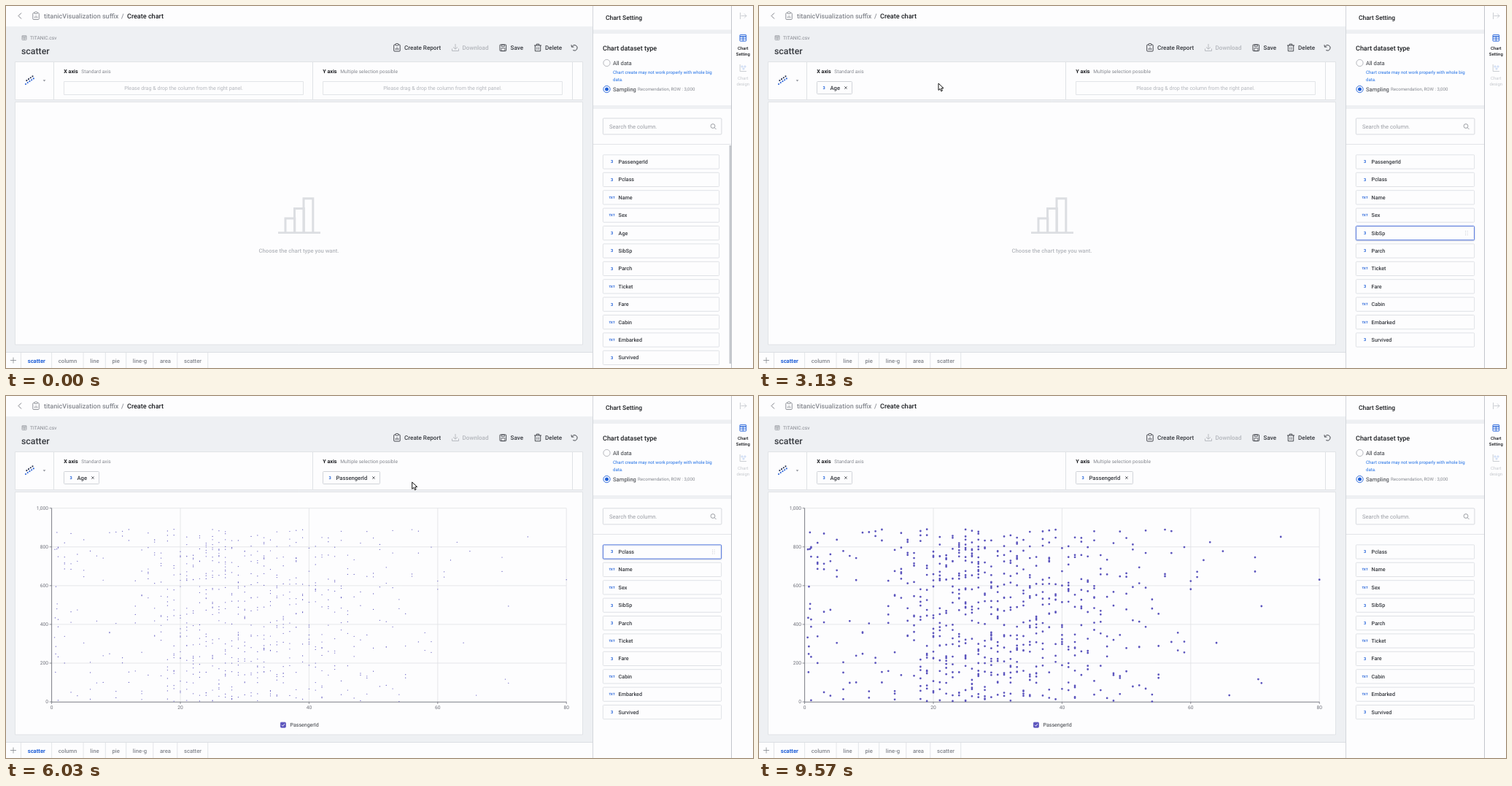
An HTML page with a canvas that plays this animation: 1024x496 px, repeating every 9.61 s.

```html
<!DOCTYPE html>
<html lang="en">
<head>
<meta charset="utf-8">
<title>Create chart</title>
<style>
html, body { margin: 0; width: 100%; height: 100%; overflow: hidden; background: #fdfdfe; }
canvas { display: block; width: 1024px; height: 496px; }
</style>
</head>
<body>
<canvas id="stage"></canvas>
<script>
const W = 1024, H = 496, LOOP = 9610;
const canvas = document.getElementById('stage');
const dpr = window.devicePixelRatio || 1;
canvas.width = W * dpr;
canvas.height = H * dpr;
const c = canvas.getContext('2d');
c.scale(dpr, dpr);
c.textRendering = 'geometricPrecision';

const WHITE = '#fdfdfe', PAGE = '#eef0f3', LINE = '#dcdfe3', INK = '#36393f', BLACK = '#1b1d21',
  MUTE = '#b3b6bc', PALE = '#c6c9ce', GREY = '#85888f', AXIS = '#6e7079', BLUE = '#1f5fd8',
  DOT = '#5b54bd';
const PROMPT = 'Please drag & drop the column from the right panel.';
const COLUMNS = ['PassengerId', 'Pclass', 'Name', 'Sex', 'Age', 'SibSp', 'Parch',
  'Ticket', 'Fare', 'Cabin', 'Embarked', 'Survived'];
const TEXTUAL = ['Name', 'Sex', 'Ticket', 'Cabin', 'Embarked'];
const TABS = ['scatter', 'column', 'line', 'pie', 'line-g', 'area', 'scatter'];

// Timeline in ms; key points are [time, x, y]
const AXES = 3480, DOTS = 5950, LEAVE = 7250, GONE = 7700;
const DRAGS = [
  { name: 'Age', from: 1720, to: 3130, width: 160,
    path: [[1720, 818, 302], [2370, 312, 115], [2970, 231, 103]] },
  { name: 'PassengerId', from: 4720, to: 5700, width: 163,
    path: [[4720, 818, 204], [4800, 812, 203], [5330, 535, 104]] },
];
const POINTER = [[1050, 1040, 330], [1500, 835, 309], [1720, 835, 309], [2370, 330, 122],
  [2970, 248, 110], [3300, 248, 110], [4450, 830, 215], [4720, 830, 215], [4800, 811, 208],
  [5330, 559, 122], [LEAVE, 558, 122], [GONE, 640, -20]];

const dragAt = t => DRAGS.find(d => t >= d.from && t < d.to);

function at(track, t) {
  const i = track.findIndex(k => k[0] > t);
  if (i < 0) return track[track.length - 1].slice(1);
  if (i === 0) return track[0].slice(1);
  const a = track[i - 1], b = track[i];
  const u = (t - a[0]) / (b[0] - a[0]), e = u * u * (3 - 2 * u);
  return [a[1] + (b[1] - a[1]) * e, a[2] + (b[2] - a[2]) * e];
}

// y is the middle of the capitals; returns the width
function text(s, x, y, size, color, weight = 400, align = 'left') {
  c.font = `${weight} ${size}px Roboto, sans-serif`;
  c.textAlign = align;
  c.fillStyle = color;
  c.fillText(s, x, y + size * 0.355);
  return c.measureText(s).width;
}
function rect(x, y, w, h, color) {
  c.fillStyle = color;
  c.fillRect(x, y, w, h);
}
function box(x, y, w, h, stroke, fill, r = 1, lw = 0.8) {
  c.beginPath();
  c.roundRect(x, y, w, h, r);
  if (fill) { c.fillStyle = fill; c.fill(); }
  c.strokeStyle = stroke;
  c.lineWidth = lw;
  c.stroke();
}
function line(color, lw, ...p) {
  c.beginPath();
  for (let i = 0; i < p.length; i += 2) c.lineTo(p[i], p[i + 1]);
  c.strokeStyle = color;
  c.lineWidth = lw;
  c.stroke();
}
function disc(x, y, r, color) {
  c.beginPath();
  c.arc(x, y, r, 0, 7);
  c.fillStyle = color;
  c.fill();
}
function ring(x, y, r, color, lw = 1, from = 0, to = 7) {
  c.beginPath();
  c.arc(x, y, r, from, to);
  c.strokeStyle = color;
  c.lineWidth = lw;
  c.stroke();
}

function clipboard(x, y, color) {
  box(x, y + 1.5, 8.5, 9, color, null, 1, 0.9);
  box(x + 2.5, y, 3.5, 2.6, color, WHITE, 0.5, 0.8);
  for (let i = 0; i < 3; i++) {
    const bx = x + 2.5 + i * 1.8;
    line(color, 0.8, bx, y + 8.5, bx, y + 6.5 - (i % 2) * 1.5);
  }
}
function table(x, y, s, color, lw) {
  box(x, y, s, s, color, null, 0.5, lw);
  line(color, lw * 1.5, x, y + s * 0.28, x + s, y + s * 0.28);
  line(color, lw, x, y + s * 0.64, x + s, y + s * 0.64);
  line(color, lw, x + s * 0.5, y + s * 0.28, x + s * 0.5, y + s);
}
function actions() {
  clipboard(531.7, 51.5, INK);
  text('Create Report', 546, 57, 8.1, INK, 500);

  line(MUTE, 0.9, 616, 52, 616, 59);
  line(MUTE, 0.9, 613, 56.3, 616, 59.2, 619, 56.3);
  line(MUTE, 0.9, 611.5, 58.5, 611.5, 61.5, 620.5, 61.5, 620.5, 58.5);
  text('Download', 625.5, 57, 8.1, MUTE, 500);

  box(677, 53, 8.6, 8.6, INK, null, 0.8, 0.9);
  box(679.2, 53, 4.2, 2.6, INK, null, 0, 0.7);
  box(679, 57.8, 4.8, 3.8, INK, null, 0, 0.7);
  text('Save', 691.5, 57, 8.1, INK, 500);

  line(INK, 0.9, 724, 54, 734, 54);
  line(INK, 0.9, 727.2, 54, 727.2, 52.2, 730.8, 52.2, 730.8, 54);
  line(INK, 0.9, 725.3, 54, 725.3, 61.8, 732.7, 61.8, 732.7, 54);
  for (const x of [727.8, 730.2]) line(INK, 0.7, x, 56.3, x, 60);
  text('Delete', 739, 57, 8.1, INK, 500);

  ring(779.3, 57.3, 3.8, INK, 0.9, -2.7, 2.2);
  line(INK, 0.9, 775, 53.2, 775.4, 56.2, 778.4, 56);
}

function tabs() {
  line(LINE, 1, 0, 474.5, 804, 474.5);
  line(GREY, 0.8, 6, 485.5, 14, 485.5);
  line(GREY, 0.8, 10, 481.5, 10, 489.5);
  let x = 20.5;
  line(LINE, 0.8, x, 475, x, H);
  TABS.forEach((s, i) => {
    x += 18 + text(s, x + 9.2, 485.8, 7.65, i ? GREY : BLUE, i ? 500 : 700);
    line(LINE, 0.8, x, 475, x, H);
  });
}

function page() {
  rect(0, 0, W, H, WHITE);
  rect(0, 28, 804, 446, PAGE);
  line(AXIS, 0.9, 21, 9.5, 17, 13.5, 21, 17.5);
  clipboard(36.8, 8, GREY);
  text('titanicVisualization suffix', 52, 13.5, 9.05, GREY, 500);
  text('/', 158, 13.5, 9.05, GREY, 500);
  text('Create chart', 166, 13.5, 9.05, BLACK, 500);
  table(22, 40.5, 6, GREY, 0.6);
  text('TITANIC.csv', 33, 43.2, 6.65, GREY);
  text('scatter', 21, 62, 12.3, INK, 500);
  actions();
  box(12.5, 76.5, 778, 52, LINE, WHITE, 0);
  box(12.5, 131.5, 778, 332.5, LINE, WHITE, 0);
  tabs();
}

function typeIcon() {
  for (let i = 0; i < 9; i++) {
    const lane = i % 2;
    disc(27 + i * 1.35, 105 - i * 0.95 + (lane ? -2 : 2), 1.1, lane ? '#2b3350' : '#2f66d8');
  }
  c.beginPath();
  c.moveTo(50.6, 101.2);
  c.lineTo(54.4, 101.2);
  c.lineTo(52.5, 103.4);
  c.fillStyle = '#8f929a';
  c.fill();
}

function chip(x, w, name) {
  box(x, 103.5, w, 17, '#c6cad0', WHITE, 1);
  text('3', x + 9.5, 112, 5.6, BLUE, 700, 'center');
  text(name, x + 18, 112, 7.65, INK, 500);
  const k = x + w - 8.6;
  line(INK, 0.8, k - 1.7, 110.3, k + 1.7, 113.7);
  line(INK, 0.8, k + 1.7, 110.3, k - 1.7, 113.7);
}
function zone(x, w, title, note, name, chipW, active) {
  if (active) rect(x, 77, w, 51, '#e1edfc');
  text(title, x + 13.3, 89.6, 7.15, BLACK, 700);
  text(note, x + 37.3, 89.6, 6.65, GREY);
  if (name) return chip(x + 13.5, chipW, name);
  if (active) c.setLineDash([1.2, 1]);
  box(x + 13.5, 103.5, 328, 18, active ? '#3f69ae' : LINE, null, 0);
  c.setLineDash([]);
  text(PROMPT, x + 177.5, 112.3, 7.13, active ? BLUE : MUTE, 400, 'center');
}
function axisPanel(t, used) {
  typeIcon();
  const [px, py] = at(POINTER, t);
  const over = dragAt(t) && py > 76 && py < 129;
  zone(66, 354.5, 'X axis', 'Standard axis', used[0], 48, over && px < 420);
  zone(421, 355.5, 'Y axis', 'Multiple selection possible', used[1], 78,
    over && px >= 420 && px < 776);
  for (const x of [65.5, 420.5, 776.5]) line(LINE, 0.9, x, 77, x, 128);
}

function emptyChart() {
  const g = '#dcdee2';
  rect(373, 309.3, 58, 2.7, g);
  for (let i = 0; i < 3; i++) {
    const x = 383 + i * 12.5, y = 291 - i * 13.6;
    line(g, 3, x, 310, x, y, x + 12.8, y, x + 12.8, 310);
  }
  text('Choose the chart type you want.', 401.5, 335, 7.65, MUTE, 500, 'center');
}

let seed = 1912;
function rnd() {
  seed = (Math.imul(seed, 1664525) + 1013904223) >>> 0;
  return seed / 4294967296;
}
// Passengers per year of age: a tail of small children and a skewed bell around 24
function crowd(age) {
  const bell = Math.exp(-(((age - 24) / (age < 24 ? 6 : 16)) ** 2) / 2);
  return 9 * Math.exp(-age / 7) + 24 * bell;
}
const points = [[66, 34], [70, 673], [70, 746], [70.5, 117], [71, 97], [71, 494], [74, 852], [80, 631]];
for (let age = 0; age <= 65; age++) {
  const n = Math.round(crowd(age) * (0.8 + rnd() * 0.4));
  for (let i = 0; i < n; i++) points.push([age || 0.4 + rnd() * 0.6, 1 + rnd() * 890]);
}

const gx = age => 62.6 + age * 8.82;
const gy = id => 419.1 - id * 0.2654;

function scatter(t) {
  const u = Math.min(1, (t - DOTS) / 450), r = 1.4 * (1 - (1 - u) ** 3);
  c.beginPath();
  for (const [age, id] of points) {
    const x = gx(age), y = gy(id);
    c.moveTo(x + r, y);
    c.arc(x, y, r, 0, 7);
  }
  c.fillStyle = DOT;
  c.fill();
  box(376.4, 447.2, 7, 7, DOT, DOT, 1);
  line('#fff', 1, 378, 450.8, 379.5, 452.3, 382, 449.2);
  text('PassengerId', 389.5, 450.7, 7.05, INK);
}
function chart(t) {
  const full = t >= DOTS, grid = '#e0e1e5';
  for (let a = 0; a <= 80; a += 20) {
    const x = gx(a);
    if (!full) c.setLineDash([2, 1]);
    if (a) line(grid, 0.8, x, 153.6, x, 419);
    c.setLineDash([]);
    line(AXIS, 0.8, x, 419, x, 422);
    text(a, x, 426.2, 6.7, AXIS, 400, 'center');
  }
  if (full) for (let v = 0; v <= 1000; v += 200) {
    const y = gy(v);
    if (v) line(grid, 0.8, 62.6, y, 768, y);
    line(AXIS, 0.8, 59.6, y, 62.6, y);
    text(v.toLocaleString('en-US'), 58, y, 6.7, AXIS, 400, 'right');
  }
  line(AXIS, 0.9, 62.6, 153.6, 62.6, 419.3, 768.2, 419.3);
  if (full) scatter(t);
}

function item(x, y, w, name, hot) {
  if (hot) {
    c.shadowColor = 'rgba(40,60,110,.15)';
    c.shadowBlur = 2 * dpr;
    c.shadowOffsetY = dpr;
  }
  box(x + 0.4, y, w - 0.8, 19.2, hot ? '#4169dd' : '#d8dbe0', WHITE, 1, hot ? 0.9 : 0.8);
  c.shadowColor = 'transparent';
  const wordy = TEXTUAL.includes(name);
  text(wordy ? 'TXT' : '3', x + 12.5, y + 9.6, wordy ? 4.4 : 5.6, BLUE, 700, 'center');
  text(name, x + 21.6, y + 9.6, 7.2, INK, 500);
  if (!hot) return;
  for (let i = 0; i < 6; i++)
    rect(x + w - 13 + (i % 2) * 2.6, y + 6.6 + (i >> 1) * 2.5, 1, 1, '#c9ccd2');
}

function settings() {
  text('Chart Setting', 822, 16.3, 8.5, BLACK, 500);
  text('Chart dataset type', 818, 58, 9, BLACK, 500);
  ring(823.5, 78, 4.6, '#a5a8ae', 0.8);
  text('All data', 832, 78, 7.65, INK);
  text('Chart create may not work properly with whole big', 832, 91, 6.12, '#1f6fe5');
  text('data.', 832, 100.5, 6.12, '#1f6fe5');
  ring(823.5, 114, 4.6, BLUE, 0.9);
  disc(823.5, 114, 2.5, BLUE);
  text('Sampling', 832, 114, 7.65, INK);
  text('Recomendation, ROW : 3,000', 866, 114, 6.12, GREY);
  box(818.4, 153.9, 162.5, 22, '#cdd0d6', null, 1);
  text('Search the column.', 827, 165, 7.65, '#9a9da4');
  ring(969, 164.5, 2.9, GREY, 0.8);
  line(GREY, 0.8, 971.1, 166.6, 973.5, 169);
}
function strip() {
  line('#c2c5cb', 1, 994.5, 0, 994.5, H);
  line(PALE, 0.9, 1006.5, 9, 1006.5, 18);
  line(PALE, 0.9, 1007.5, 13.5, 1015, 13.5);
  line(PALE, 0.9, 1012, 10.5, 1015, 13.5, 1012, 16.5);
  table(1006, 39.5, 8.6, BLUE, 0.9);
  text('Chart', 1010.3, 57.7, 5.95, BLACK, 500, 'center');
  text('Setting', 1010.3, 66, 5.95, BLACK, 500, 'center');
  line(PALE, 0.9, 1006.2, 80, 1006.2, 89.5, 1015, 89.5);
  for (let i = 0; i < 3; i++) ring(1009 + i * 2, 83 + (i % 2) * 3, 1.1, '#b9cdf0', 0.8);
  text('Chart', 1010.3, 99, 5.95, PALE, 400, 'center');
  text('design', 1010.3, 107.2, 5.95, PALE, 400, 'center');
}
function sidebar(t, used) {
  rect(805, 0, 219, H, WHITE);
  rect(805, 32.5, 189, 5.5, PAGE);
  rect(805, 136, 189, 5, PAGE);
  line('#d3d6db', 1, 804.5, 0, 804.5, H);
  line(LINE, 0.8, 805, 189.5, 994, 189.5);
  settings();

  // The hovered row stays lit until the pointer moves again
  const hot = t > 1400 && t < 3270 ? 4 : t > 4250 && t < LEAVE ? 0 : -1;
  const w = used.length ? 163 : 160;
  COLUMNS.filter(n => !used.includes(n))
    .forEach((n, i) => item(818, 203.9 + i * 24.4, w, n, i === hot));
  if (!used.length) rect(991.5, 191, 2.5, 299, '#c5c8cd');
  strip();
}

function ghost(t) {
  const d = dragAt(t);
  if (!d) return;
  const [x, y] = at(d.path, t), since = t - d.from;
  if (since > 30 && since < 110) {
    rect(x, y, d.width, 19.5, '#3d3d40');
    text('3', x + 18.5, y + 10, 5.6, '#16204a', 700, 'center');
    text(d.name, x + 27.6, y + 10, 7.2, '#131315', 500);
    return;
  }
  c.globalAlpha = 0.74;
  item(x, y, d.width, d.name, true);
  c.globalAlpha = 1;
}

function fist() {
  c.moveTo(-2.4, 3.8);
  c.quadraticCurveTo(-5, 1.6, -4.4, 0);
  c.quadraticCurveTo(-3.8, -0.8, -2.8, 0);
  c.quadraticCurveTo(-3.4, -3.2, -1.5, -3);
  c.quadraticCurveTo(0, -4.4, 1, -3);
  c.quadraticCurveTo(2.6, -3.8, 3, -2.3);
  c.quadraticCurveTo(4.9, -2.4, 4.6, 0);
  c.quadraticCurveTo(4.6, 2, 3.4, 3.8);
}
function arrow() {
  c.translate(-2, -4);
  for (const [x, y] of [[0, 0], [0, 9.4], [2.2, 7.4], [3.8, 10.8], [5.4, 10], [3.9, 6.8], [7, 6.6]])
    c.lineTo(x, y);
}
function pointer(t) {
  if (t < POINTER[0][0] || t > GONE) return;
  c.save();
  c.translate(...at(POINTER, t));
  c.lineJoin = 'round';
  c.beginPath();
  if (dragAt(t)) fist(); else arrow();
  c.closePath();
  c.fillStyle = '#fff';
  c.fill();
  c.strokeStyle = '#111';
  c.lineWidth = 1;
  c.stroke();
  c.restore();
}

function draw(now) {
  const t = now % LOOP;
  const used = DRAGS.filter(d => t >= d.to).map(d => d.name);
  page();
  axisPanel(t, used);
  if (t < AXES) emptyChart(); else chart(t);
  sidebar(t, used);
  ghost(t);
  pointer(t);
}

let start;
function tick(now) {
  start ??= now;
  draw(now - start);
  requestAnimationFrame(tick);
}
draw(0);
requestAnimationFrame(tick);
</script>
</body>
</html>
```
